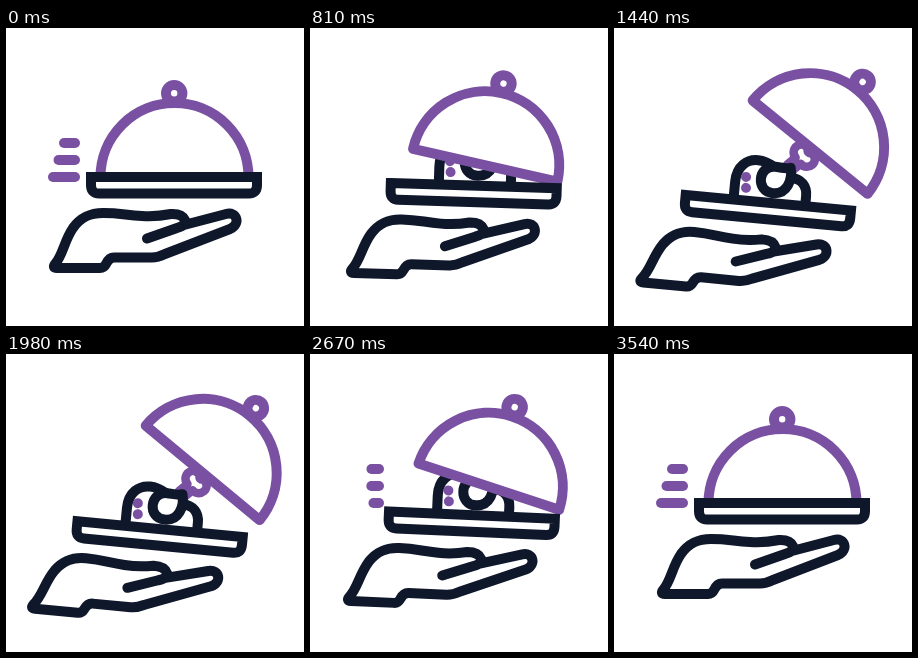
An HTML page that plays this animation: 298 px wide and 298 px high, repeating every 3600 ms.

```html
<!DOCTYPE html>
<html lang="en">
<head>
<meta charset="utf-8">
<title>Serving dish</title>
<style>
  html, body { margin: 0; width: 100%; height: 100%; overflow: hidden; background: #fff; }
  svg { display: block; width: 100vw; height: 100vh; }
  path { stroke-width: 10; stroke-linecap: round; stroke-linejoin: round; fill: none; }
  .dark { stroke: #0f172b; }
  .purple { stroke: #7a51a2; }
  .solid { fill: #fff; }
</style>
</head>
<body>
<svg viewBox="0 0 298 298">
  <g class="tilt">
    <path class="purple" style="stroke-width:8.5" transform="translate(186 112) rotate(45)"
      d="M-4 0V-11C-15 -11 -15 -28 -3 -26Q0 -22 3 -26C15 -28 15 -11 4 -11V0"/>
    <path class="dark solid" d="M133 149V131C133 115 143 107.500 154 107.500C161 107.500 166 110 171 113L188 122C199 122 205 129 205 139V149"/>
    <path class="dark solid" d="M187 112C190 124 186 139 171.500 139C154 139 154 112.500 171.500 112.500C177 112.500 182 114 187 112Z"/>
    <path class="purple" d="M143.400 125.300h.01M144.400 136.200h.01"/>
  </g>
  <g id="lid" class="purple">
    <path class="solid" d="M94.500 149A74 74 0 0 1 242.500 149Z"/>
    <path class="solid" d="M160 65.300a8.200 8.200 0 1 1 16.400 0a8.200 8.200 0 1 1 -16.400 0Z"/>
  </g>
  <g class="tilt dark">
    <path class="solid" style="stroke-linejoin:miter" d="M85 149H251V157Q251 165.500 243 165.500H93Q85 165.500 85 157Z"/>
    <path d="M141 210.500L171 200Q181 197 179 192Q176 185.500 165 186Q150 189 136 188C119 187 114 185 97 185C84 185 75 189 67 200C58 213 57 227 49 236Q46 240 51 240H94Q98 240 100 236Q103 229.500 108 229.500H146Q152 229.500 159 226L224 201C235 196 231 183 220 186L178 197"/>
  </g>
  <path class="purple dash"/>
  <path class="purple dash"/>
  <path class="purple dash"/>
</svg>
<script>
  const LOOP = 3600, HALF = 1770;
  const lid = document.getElementById('lid');
  const tilted = document.querySelectorAll('.tilt');
  const dashes = document.querySelectorAll('.dash');

  const clamp = v => Math.min(1, Math.max(0, v));
  const smooth = v => (v = clamp(v)) * v * (3 - 2 * v);

  // cubic-bezier(.8, 0, .2, 1)
  function ease(x) {
    let lo = 0, hi = 1, s = 0.5;
    for (let i = 0; i < 24; i++) {
      s = (lo + hi) / 2;
      const bx = 2.4 * s * (1 - s) ** 2 + 0.6 * s * s * (1 - s) + s ** 3;
      if (bx < x) lo = s; else hi = s;
    }
    return s * s * (3 - 2 * s);
  }

  function draw(t) {
    const open = ease(clamp(1 - Math.abs(t - HALF) / HALF));
    lid.setAttribute('transform', `rotate(${40 * open} 224.4 173)`);
    tilted.forEach(g => g.setAttribute('transform', `rotate(${5.5 * open} -114 16)`));

    dashes.forEach((dash, i) => {
      const shown = t < HALF
        ? 1 - smooth((t - 60 * i) / 510)
        : smooth((t - 2420 - 60 * i) / 400);
      const length = (11 + 5.500 * i) * shown;
      dash.setAttribute('d', shown > 0 ? `M69 ${115 + 17 * i}h${-length - 0.01}` : '');
    });
  }

  function tick(now) {
    draw(now % LOOP);
    requestAnimationFrame(tick);
  }
  draw(0);
  requestAnimationFrame(tick);
</script>
</body>
</html>
```
